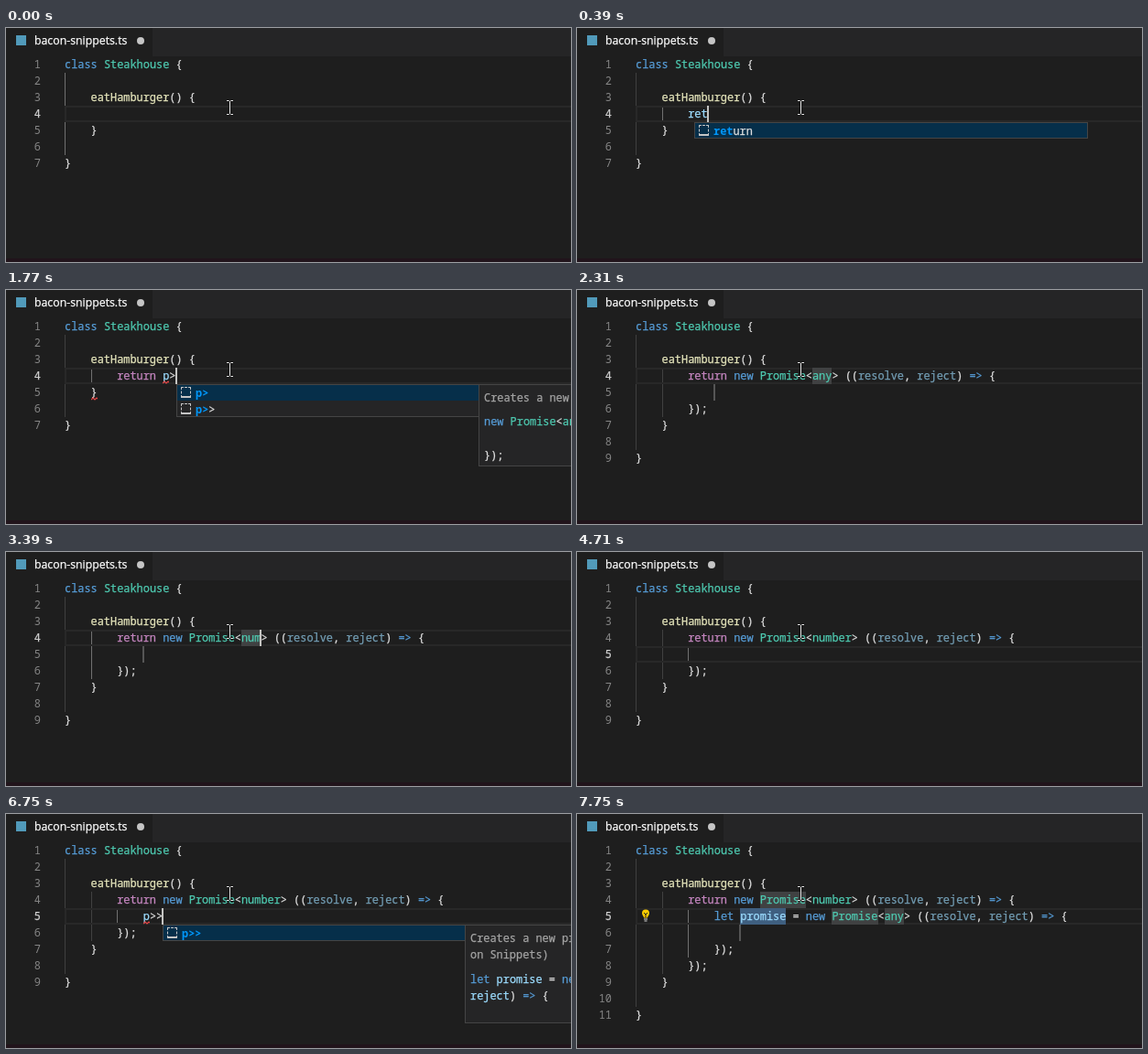
Animation of 617 by 256 pixels, one loop 8 s. Source, as an HTML page:

```html
<!DOCTYPE html>
<html lang="en">
<head>
<meta charset="utf-8">
<title>Snippet typing</title>
<style>
  html, body { margin: 0; width: 100%; height: 100%; overflow: hidden; background: #1e1e1e; }
  #stage { position: relative; width: 617px; height: 256px; overflow: hidden; background: #1e1e1e;
    font: 11.917px/18px "Noto Sans Mono", "DejaVu Sans Mono", monospace; color: #dedede;
    -webkit-text-stroke: .25px currentColor; }
  #stage div, #stage svg { position: absolute; box-sizing: border-box; white-space: pre; }
  .bar { left: 0; top: 0; width: 617px; height: 31px; background: #252526; }
  .tab { left: 0; top: 0; width: 160px; height: 31px; background: #1e1e1e; color: #fff;
    font: 12.3px/28px "Open Sans", "Noto Sans", sans-serif; }
  .mark { left: 11px; top: 8px; width: 11px; height: 11px; background: #519aba; }
  .name { left: 31px; top: 0; }
  .dot { left: 143px; top: 10px; width: 8px; height: 8px; border-radius: 50%; background: #c5c5c5; }
  .foot { left: 0; top: 252px; width: 617px; height: 4px; background: #21141b; }
  .num { left: 0; width: 38px; text-align: right; color: #858585; -webkit-text-stroke-width: 0; }
  .num.on { color: #d0d0d0; -webkit-text-stroke-width: .25px; }
  .row { left: 64px; width: 553px; height: 18px; border: solid #282828; border-width: 2px 0 2px 2px; }
  .guide { width: 1px; background: #404040; }
  .guide.on { background: #707070; }
  .caret { width: 2px; height: 18px; background: #c4c4c2; }
  .stop { width: 2px; height: 18px; background: #555; }
  .mk { height: 18px; background: #404142; }
  .mk.sel { background: #3f5f80; }
  .list, .docs { background: #252526; border: 1px solid #454545; overflow: hidden; }
  .item { left: 0; width: 100%; height: 18px; padding-left: 20px; line-height: 19px; }
  .item.on { background: #062f4a; }
  .item b { color: #0097fb; font-weight: 600; -webkit-text-stroke-width: 0; }
  .icon { left: 4px; top: 3px; width: 11px; height: 12px; border: 1px dashed #c5c5c5; border-bottom: 2px solid #c5c5c5; }
  .kw { color: #569cd6; } .ret { color: #c586c0; } .type { color: #4ec9b0; }
  .fn { color: #e6e6bc; } .id { color: #9cdcfe; } .dim { opacity: .667; } .note { color: #a4a4a4; }
</style>
</head>
<body>
<div id="stage">
  <div class="bar"></div>
  <div class="tab"><div class="mark"></div><div class="name">bacon-snippets.ts</div><div class="dot"></div></div>
  <div id="editor"></div>
  <svg style="left:239px;top:78px" width="11" height="18" fill="none">
    <path d="M2 1.5H4.5L5.5 2.5L6.5 1.5H9M5.5 2V15.5M2 16.5H4.5L5.5 15.5L6.5 16.5H9" stroke="#111" stroke-width="2"/>
    <path d="M2 1.5H4.5L5.5 2.5L6.5 1.5H9M5.5 2V15.5M2 16.5H4.5L5.5 15.5L6.5 16.5H9" stroke="#e6e6e6"/>
  </svg>
  <div class="foot"></div>
</div>
<script>
const LOOP = 8000, CHAR = 7.15, LEFT = 63.5, LINE = 18;
const colX = c => Math.ceil(LEFT + c * CHAR);
const rowY = r => 31 + (r - 1) * LINE;

// Document text
const code = (...body) => ['class Steakhouse {', '', '    eatHamburger() {', ...body, '    }', '', '}'];
const tail = ' ((resolve, reject) => {';
const word = w => code('        ' + w);
const promise = (type, inner = '') =>
  code(`        return new Promise<${type}>${tail}`, inner, '        });');
const inner = w => promise('number', '            ' + w);
const nested = code(`        return new Promise<number>${tail}`,
  `            let promise = new Promise<any>${tail}`, '', '            });', '        });');

// Indent guides: column, first row, last row, active
const outer = [[0, 2, 6], [4, 4, 4, 1]];
const wrap = on => [[0, 2, 8], [4, 4, 6, on]];
const deep = [[0, 2, 8], [4, 4, 6], [8, 5, 5, 1]];
const deepest = [[0, 2, 10], [4, 4, 8], [8, 5, 7, 1]];

// Suggestions
const rWords = ['return', 'readonly', 'require', 'RangeError', 'Range', 'ReadableStream', 'ReferenceError',
  'RegExp', 'Request', 'Response', 'removeEventListener', 'resizeTo'];
const pWords = ['package', 'p>', 'p>>', 'parent', 'parseFloat', 'parseInt', 'performance', 'postMessage',
  'print', 'private', 'process', 'prompt'];
const pop = (col, typed, items, docs) => ({ col, typed, docs,
  items: items.filter(w => w.toLowerCase().startsWith(typed)) });
const snips = ['p>', 'p>>'];
const docNew = { h: 90, note: [[5, 'Creates a new promise']],
  code: [[31, 'new Promise<any>((resolve, reject) => {'], [68, '});']] };
const docLet = { h: 108, note: [[5, 'Creates a new promise (Bacon'], [23, 'on Snippets)']],
  code: [[50, 'let promise = new Promise<any>((resolve,'], [68, 'reject) => {']] };

const typeArg = (s, on = 1) => ({ text: promise(s), col: 27 + s.length, caret: 1, guides: wrap(on),
  marks: [[4, 27, s.length]] });
const typeReturn = n => {
  const s = 'return'.slice(0, n);
  return { text: word(s), col: 8 + n, pop: pop(9, s, rWords) };
};

// Each step: time, changes to the state
const steps = [
  [0, { text: word(''), row: 4, col: 8, caret: 0, guides: [[0, 2, 6, 1]], marks: [], errors: [] }],
  [80, { text: word('r'), col: 9, caret: 1, guides: outer }],
  [160, typeReturn(1)],
  ...[310, 390, 460, 540, 610].map((t, i) => [t, typeReturn(i + 2)]),
  [690, { text: word('return '), col: 15, pop: null }],
  [1150, { text: word('return p'), col: 16 }],
  [1230, { pop: pop(16, 'p', pWords) }],
  [1310, { text: word('return p>'), col: 17, pop: null }],
  [1380, { pop: pop(17, 'p>', snips) }],
  [1460, { pop: pop(17, 'p>', snips, docNew) }],
  [1770, { errors: [[4, 15], [5, 4]] }],
  [1850, { ...typeArg('any', 0), pop: null, errors: [[7, 4]], fresh: 4, stop: [5, 12] }],
  [2230, { errors: [], fresh: 0 }],
  [2310, { caret: 0 }],
  [2840, { caret: 1 }],
  [3160, typeArg('n')],
  [3240, typeArg('nu')],
  [3390, typeArg('num')],
  [3620, typeArg('numb')],
  [3700, typeArg('number')],
  [4160, { row: 5, col: 12, guides: deep, marks: [], stop: null }],
  [4710, { caret: 0 }],
  [5170, { caret: 1 }],
  [5640, { caret: 0 }],
  [6020, { text: inner('p'), col: 13, caret: 1 }],
  [6100, { pop: pop(13, 'p', pWords) }],
  [6420, { text: inner('p>'), col: 14, pop: null }],
  [6500, { pop: pop(14, 'p>', snips), errors: [[5, 12]] }],
  [6580, { pop: pop(14, 'p>', snips, docNew) }],
  [6750, { text: inner('p>>'), col: 15, pop: pop(15, 'p>>', snips, docLet) }],
  [7130, { text: nested, col: 23, pop: null, guides: deepest, stop: [6, 16], fresh: 5, errors: [[8, 8]],
    marks: [[4, 19, 7], [5, 16, 7, 1], [5, 30, 7], [5, 38, 3]] }],
  [7510, { fresh: 0, errors: [] }],
  [7680, { caret: 0 }],
  [7750, { bulb: 5 }]
];
let last = {};
const states = steps.map(([, change]) => last = { ...last, ...change });

// Drawing
const esc = s => s.replace(/&/g, '&amp;').replace(/</g, '&lt;').replace(/>/g, '&gt;');
const box = (cls, x, y, html = '', size = '') =>
  `<div class="${cls}" style="left:${x}px;top:${y}px;${size}">${html}</div>`;
const size = (w, h) => `width:${w}px;height:${h}px`;

function kind(w, typed) {
  if (typed || /^(Steakhouse|Promise)$/.test(w)) return 'type';
  if (/^(class|new|let|=>)$/.test(w)) return 'kw';
  if (w === 'return') return 'ret';
  if (w === 'eatHamburger') return 'fn';
  return /^\w/.test(w) ? 'id' : '';
}
function paint(line, dim) {
  return line.replace(/\w+|=>|[^\w=]+|=/g, (w, at) => {
    const cls = kind(w, line[at - 1] === '<');
    const faded = dim && /^(resolve|reject)$/.test(w) ? ' dim' : '';
    return cls ? `<span class="${cls}${faded}">${esc(w)}</span>` : esc(w);
  });
}
function squiggle([r, c]) {
  return `<svg style="left:${colX(c)}px;top:${rowY(r) + 14}px" width="7" height="4">
    <path d="M0 3L2 1L4 3L6 1L7 2" fill="none" stroke="#ea4646" stroke-width="1.2"/></svg>`;
}
function lightbulb(r) {
  return `<svg style="left:69px;top:${rowY(r)}px" width="12" height="17">
    <path d="M4 10.5C4 9 2 8 2 5.6A4 4 0 0 1 10 5.6C10 8 8 9 8 10.5Z" fill="#fc0"/>
    <path d="M4 5L6 7L8 5M6 7V10" fill="none" stroke="#1e1e1e"/>
    <path d="M4 12H8M4.5 14H7.5" stroke="#d8d8d8"/></svg>`;
}
function suggest({ col, typed, items, docs }, row) {
  const x = colX(col), y = rowY(row + 1), w = docs ? 331 : 430;
  const list = items.map((s, i) => box('item' + (i ? '' : ' on'), 0, i * LINE - 1,
    `<div class="icon"></div><b>${esc(s.slice(0, typed.length))}</b>${esc(s.slice(typed.length))}`)).join('');
  let html = box('list', x, y, list, size(w, items.length * LINE));
  if (docs) {
    const text = docs.note.map(([top, s]) => box('note', 5, top - 1, esc(s))).join('') +
      docs.code.map(([top, s]) => box('', 5, top - 1, paint(s))).join('');
    html += box('docs', x + 330, y, text, size(331, docs.h));
  }
  return html;
}
function draw(s) {
  let html = '';
  for (const [c, a, b, on] of s.guides)
    html += box(on ? 'guide on' : 'guide', colX(c), rowY(a), '', `height:${(b - a + 1) * LINE}px`);
  html += box('row', 64, rowY(s.row));
  for (const [r, c, n, sel] of s.marks)
    html += box(sel ? 'mk sel' : 'mk', colX(c), rowY(r), '', `width:${colX(c + n) - colX(c)}px`);
  s.text.forEach((line, i) => {
    const r = i + 1, y = rowY(r) - 1;
    html += box(r === s.row ? 'num on' : 'num', 0, y, r) + box('', 64, y, paint(line, r !== s.fresh));
  });
  html += s.errors.map(squiggle).join('');
  if (s.stop) html += box('stop', colX(s.stop[1]) - 1, rowY(s.stop[0]));
  if (s.caret) html += box('caret', colX(s.col) - 1, rowY(s.row));
  if (s.bulb) html += lightbulb(s.bulb);
  if (s.pop && s.pop.items.length) html += suggest(s.pop, s.row);
  return html;
}

const editor = document.getElementById('editor');
let shown = -1;
function tick() {
  const t = performance.now() % LOOP;
  let i = steps.length - 1;
  while (steps[i][0] > t) i--;
  if (i !== shown) editor.innerHTML = draw(states[shown = i]);
  requestAnimationFrame(tick);
}
tick();
</script>
</body>
</html>
```
